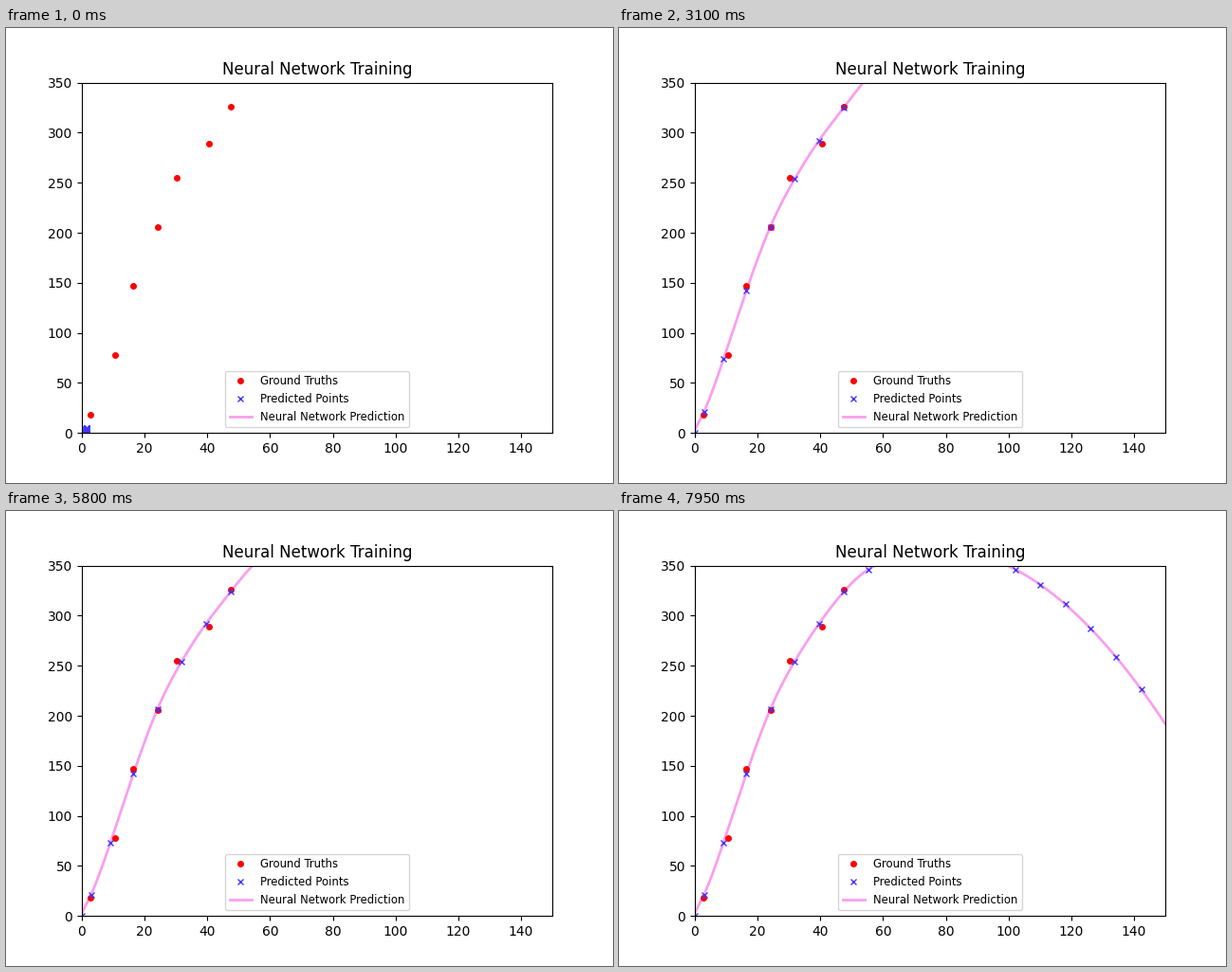
A matplotlib script that plays this animation: 640x480 px, repeating every 8 s.

```python
import numpy as np
import matplotlib.pyplot as plt
from matplotlib.animation import FuncAnimation

FRAMES, INTERVAL = 160, 50
GROWTH = 900  # ms until the curve first passes near the data

# Curve parameter: every whole step carries a predicted point.
KNOTS = np.arange(23)
FINE = np.linspace(0, 22, 400)

TRUTH_X = [2.8, 10.6, 16.4, 24.2, 30.2, 40.6, 47.6]
TRUTH_Y = [18, 77.5, 147, 205.5, 255, 289, 326]

# Heights the fit settles on for steps 0 to 7.
FIT_Y = [0, 21, 73.4, 142, 206.5, 254.3, 292, 323.7]

# Beyond step 8 the curve is a parabola whose shape drifts during training:
# time, height at step 8, slope, bend, x stretch, leftover wobble.
TIMES, *SHAPE = np.array([
    (1550, 372.0, 40.0, -0.30, 0.0030, 1.0),
    (3100, 356.0, 27.0, -0.90, 0.0060, 0.15),
    (4400, 352.0, 22.0, -1.00, 0.0080, 0.0),
    (5200, 354.0, 19.0, -1.25, 0.0085, 0.0),
    (6350, 350.5, 16.5, -2.05, 0.0087, 0.0),
    (7050, 350.5, 23.2, -3.08, 0.0027, 0.0),
    (7950, 346.0, 13.1, -2.18, 0.0010, 0.0),
]).T


def spline(y, t):
    """Natural cubic spline through values y at the whole steps."""
    n = len(y)
    m = 4 * np.eye(n) + np.eye(n, k=1) + np.eye(n, k=-1)
    m[[0, -1]] = np.eye(n)[[0, -1]]
    bend = np.linalg.solve(m, np.r_[0, 6 * np.diff(y, 2), 0])
    i = np.minimum(t.astype(int), n - 2)
    u = t - i
    v = 1 - u
    return (v * y[i] + u * y[i + 1]
            + ((v ** 3 - v) * bend[i] + (u ** 3 - u) * bend[i + 1]) / 6)


def growing(g, t):
    """Curve unfolding from a tiny clump (g=0) to a nearly straight line (g=1)."""
    reach = 4 / (1.025 - g)
    x = 6.9 * np.sqrt(g) * t + 1.5 * (1 - g) * (1 - np.exp(-t / 2))
    y = (49 * g * reach * (1 - np.exp(-t / reach))
         + 4.8 * (1 - g) * np.sin(np.pi * (t / 22) ** 0.6))
    return np.array([x, y])


def fitting(ms, t):
    """Curve once it follows the data."""
    y8, slope, bend, stretch, wobble = (np.interp(ms, TIMES, p) for p in SHAPE)
    x = (7.8 * t - 7.2 * (1 - np.exp(-1.15 * t))
         + stretch * np.maximum(t - 8, 0) ** 3)
    k = KNOTS[:8]
    head = FIT_Y + wobble * k * np.cos(2 * np.pi * (k - 2) / 5)
    s = KNOTS[8:] - 8
    y = spline(np.r_[head, y8 + slope * s + bend * s ** 2], t)
    return np.array([x, y])


def curve_at(ms, t):
    if ms < GROWTH:
        return growing(ms / GROWTH, t)
    mix = min((ms - GROWTH) / (TIMES[0] - GROWTH), 1)
    return (1 - mix) * growing(1, t) + mix * fitting(ms, t)


fig, ax = plt.subplots(figsize=(6.4, 4.8), dpi=100)
ax.set_title("Neural Network Training")
ax.set_xlim(0, 150)
ax.set_ylim(0, 350)
ax.plot(TRUTH_X, TRUTH_Y, "o", color="red", ms=4, zorder=2.1,
        label="Ground Truths")
points, = ax.plot([], [], "x", color="#4433ff", ms=4, zorder=2.2,
                  label="Predicted Points")
curve, = ax.plot([], [], color="#f99fee", lw=2, zorder=2,
                 label="Neural Network Prediction")
ax.legend(loc="lower center", fontsize="small")


def update(frame):
    ms = frame * INTERVAL
    points.set_data(*curve_at(ms, KNOTS[:20].astype(float)))
    curve.set_data(*curve_at(ms, FINE))
    return points, curve


anim = FuncAnimation(fig, update, frames=FRAMES, interval=INTERVAL,
                     repeat=True, repeat_delay=0)
plt.show()
```
